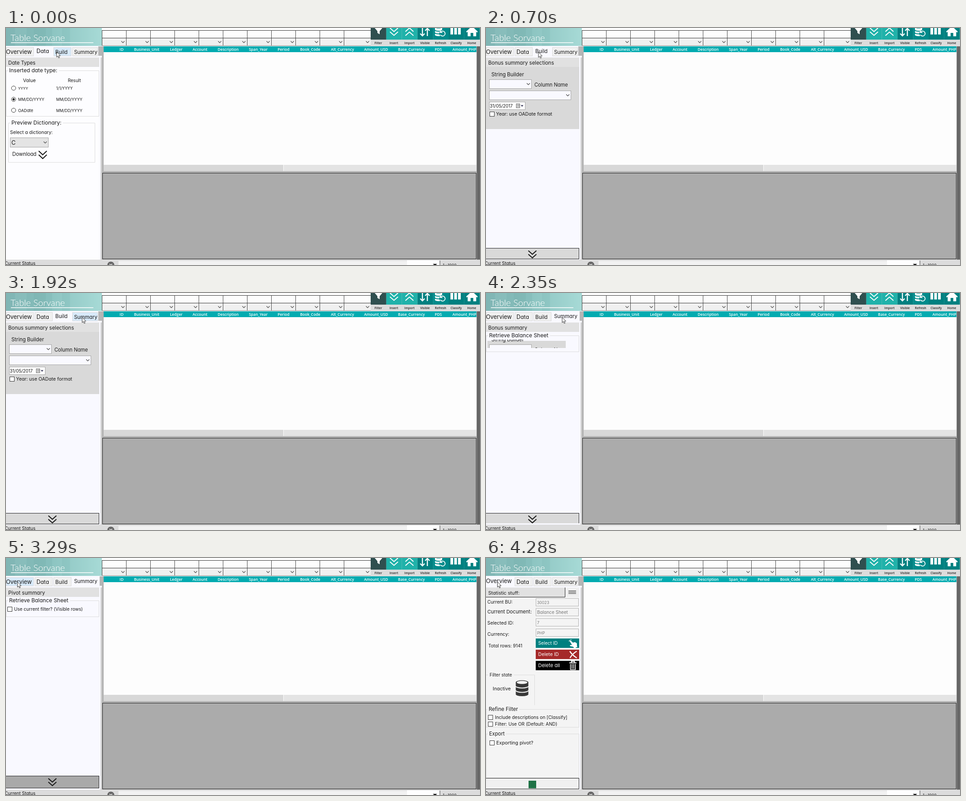
Animation of 1058x530 px, one loop 8.84 s. Source, as an HTML page:

```html
<!DOCTYPE html>
<html lang="en">
<head>
<meta charset="utf-8">
<title>Query panel</title>
<style>
  html, body { margin: 0; width: 100%; height: 100%; overflow: hidden; background: #fff; }
  #stage { display: block; width: 1058px; height: 530px; font-family: Inter, sans-serif; font-feature-settings: "cv11"; }
  .grid { font-family: "Open Sans", sans-serif; font-weight: 600; }
  .title { font-family: Lato, sans-serif; font-weight: 300; }
</style>
</head>
<body>
<svg id="stage" viewBox="0 0 1058 530" xmlns="http://www.w3.org/2000/svg"></svg>
<script>
const LOOP = 8840;
const PANEL = '#f9f9ff', BAR = '#e1e1e1', BLOCK = '#d9d9d9', PALE = '#f4f4f4', INK = '#1a1a1a', EDGE = '#dcdcdc';

// time, page, active tab, hovered tab (-1: none), pointer x, y
const STEPS = [
  [0, 'data', 1, 2, 112.5, 53],
  [120, 'data', 1, 2, 115.5, 53],
  [270, 'data', 1, 2, 116.5, 53.5],
  [700, 'build', 2, -1, 116.5, 53.5],
  [1380, 'build', 2, -1, 132, 57],
  [1530, 'build', 2, -1, 148, 64],
  [1650, 'build', 2, -1, 162, 66],
  [1800, 'build', 2, 3, 167, 58],
  [1920, 'build', 2, 3, 169.5, 54],
  [2350, 'summaryPaint', 3, -1, 169.5, 54],
  [2470, 'summary', 3, -1, 169.5, 54],
  [2900, 'summary', 3, 2, 108, 54],
  [3020, 'summary', 3, 0, 51, 53],
  [3170, 'summary', 3, 0, 34, 53],
  [3290, 'summary', 3, 0, 25, 53],
  [4130, 'overviewPaint', 0, -1, 25, 53],
  [4280, 'overview', 0, -1, 25, 53]
];

const rect = (x, y, w, h, fill, stroke) => stroke
  ? `<rect x="${x + .5}" y="${y + .5}" width="${w - 1}" height="${h - 1}" fill="${fill}" stroke="${stroke}"/>`
  : `<rect x="${x}" y="${y}" width="${w}" height="${h}" fill="${fill}"/>`;
const text = (x, y, size, str, fill = INK, attrs = '') =>
  `<text x="${x}" y="${y}" font-size="${size}" fill="${fill}" ${attrs}>${str}</text>`;
const path = (d, stroke, width = 1, fill = 'none') =>
  `<path d="${d}" fill="${fill}" stroke="${stroke}" stroke-width="${width}"/>`;
const shape = (d, fill) => path(d, 'none', 0, fill);
const clip = (x, y, w, h, body) =>
  `<svg x="${x}" y="${y}" width="${w}" height="${h}" viewBox="${x} ${y} ${w} ${h}">${body}</svg>`;

const arrow = (x, y, color = '#444') => path(`M${x - 3.5} ${y - 2}l3.5 3.5 3.5 -3.5`, color, 1.1);
const chevrons = (x, y, w, h, gap, color, width = 2.2) => [0, gap].map(g =>
  path(`M${x - w} ${y + g}l${w} ${h} ${w} ${-h}`, color, width)).join('');
const combo = (x, y, w, h, fill = PANEL) =>
  rect(x, y, w, h, fill, '#a5a5a5') + arrow(x + w - 7.5, y + h / 2);
const check = (x, y) => rect(x, y, 11, 11, '#fff', '#333');
const radio = (y, on) => `<circle cx="17" cy="${y}" r="4.8" fill="#fff" stroke="#333"/>` +
  (on ? `<circle cx="17" cy="${y}" r="2.6" fill="#222"/>` : '');

// Frame with its caption breaking the top line
const group = (x, y, w, h, tx, gap, size, label) =>
  path(`M${tx - 3} ${y + .5}H${x + .5}V${y + h - .5}H${x + w - .5}V${y + .5}H${tx + gap + 2}`, EDGE) +
  text(tx, y + 4.2, size, label);
const panel = (fill = PANEL) => rect(0, 62, 208, 456, fill);
const heading = (size, label) => rect(0, 66, 208, 21, BAR) + text(5, 82, size, label);
const footer = (y, h, fill) => rect(-2, y, 210, h, fill, '#222');
const balanceGroup = () => group(0, 95, 208, 37, 7, 134, 12, 'Retrieve Balance Sheet');

// Cylinder of three discs
const disks = (x, y, w, h, color, gap) => {
  const r = w / 2, e = w * .17, band = (h - e) / 3;
  return [2, 1, 0].map(i => {
    const top = y + i * band + e, bottom = top + band - e * .3;
    return path(`M${x} ${top}A${r} ${e} 0 0 1 ${x + w} ${top}V${bottom}A${r} ${e} 0 0 1 ${x} ${bottom}Z`, gap, 2, color);
  }).join('') + `<ellipse cx="${x + r}" cy="${y + e + .6}" rx="${r - 3}" ry="${e - 1.6}" fill="${gap}"/>`;
};

function header() {
  const stripes = [[0, 20, .05], [46, 16, .05], [62, 27, .09], [89, 14, .04], [125, 18, .05]];
  return `<defs><linearGradient id="sky"><stop offset="0" stop-color="#86b9b8"/>
    <stop offset=".45" stop-color="#8bc3c0"/><stop offset="1" stop-color="#a7dad6"/></linearGradient></defs>` +
    rect(0, 0, 214, 40, 'url(#sky)') +
    stripes.map(([x, w, a]) => `<rect x="${x}" width="${w}" height="40" fill="#175c5c" opacity="${a}"/>`).join('') +
    text(10, 28.5, 20.3, 'Table Sorvane', '#fff', 'class="title"') + rect(11, 32, 184, 1.5, '#fff');
}

function filterRow() {
  let out = rect(214, 0, 600, 40, '#fdfdfd') + rect(214, 22, 600, 18, '#f0f0f0');
  for (let x = 214; x < 808; x += 54) {
    const end = x === 754 ? 814 : x + 54;
    out += arrow(end - 7, 31.5) + rect(x, 5, 1, 35, '#444');
  }
  return out + rect(214, 5, 600, 1, '#333') + rect(214, 22, 600, 1, '#333') + rect(214, 39, 600, 1, '#888');
}

function toolbar() {
  const items = [['Filter', '#2f4f4f'], ['Insert', '#20b2aa'], ['Import', '#20b2aa'], ['Visible', '#008080'],
    ['Refresh', '#008b8b'], ['Classify', '#008080'], ['Home', '#008080']];
  const w = '#fff';
  return rect(814, 0, 244, 41, '#dcdcdc') + items.map(([label, fill], i) =>
      rect(814 + i * 34.8, 0, 34.8, 26, fill) +
      text(831 + i * 34.75, 36.3, 6.9, label, '#222', 'class="grid" text-anchor="middle"')).join('') +
    shape('M823 0H840L834 7V14L829 11V7Z', w) +
    chevrons(866, 0, 9, 8, 8.5, w, 2) + chevrons(900.5, 8, 9, -8, 9, w, 2) +
    path('M929.5 0V17.5M924.5 12.5l5 5 5-5M940.5 18V1M935.5 6l5-5 5 5', w, 2.4) +
    disks(956.5, -4, 18, 21, w, '#008b8b') +
    `<circle cx="974.5" cy="12.5" r="7.5" fill="#008b8b"/>` +
    path('M969.8 9.5a5.6 5.6 0 1 1 -.2 5.6M969.5 5.5v4.5h4.5', w, 1.8) +
    [992, 1000.5, 1009].map(x => rect(x, 0, 6, 14.5, w)).join('') +
    shape('M1027 8L1040 -4 1053 8 1051.5 10 1049.5 8.3V18.5H1043V11H1037V18.5H1030.5V8.3L1028.5 10Z', w);
}

function table() {
  const cols = [['ID', 258], ['Business_Unit', 314], ['Ledger', 380], ['Account', 433], ['Description', 496],
    ['Span_Year', 563], ['Period', 619.5], ['Book_Code', 679], ['Alt_Currency', 751], ['Amount_USD', 826],
    ['Base_Currency', 905], ['PDS', 965], ['Amount_PHP', 1023]];
  return rect(214, 41, 844, 477, '#b4b4b4') + rect(1051, 41, 7, 477, '#666') +
    rect(218, 41, 832, 13, '#03abb0') +
    cols.map(([name, x]) => text(x, 51, 8.45, name, '#fff', 'class="grid" text-anchor="middle"')).join('') +
    rect(218, 54, 832, 252, '#fdfdfd') + rect(218, 306, 832, 14, '#e4e4e4') +
    rect(218, 306, 401, 14, '#d8d8d8') + rect(619, 306, 1, 14, '#fff') +
    rect(215, 324, 835, 193, '#ababab', '#222');
}

function status() {
  return rect(0, 518, 1058, 12, '#dcdcdc') + text(-3, 530, 10, 'Current Status') +
    `<circle cx="234" cy="530.5" r="8" fill="#666"/>` + path('M231 527.5l6 6m0-6l-6 6', '#eee', 1.6) +
    rect(251, 521, 644, 9, '#f2f2f2') + rect(895, 520, 73, 10, '#fff') +
    shape('M953 527.5h9l-4.5 5z', '#111') + rect(968, 520, 1, 10, '#444') + text(975, 533.5, 8.6, '1 : 1000');
}

const TABS = [['Overview', 0, 62, 0, 12.9], ['Data', 64, 40, 68, 12.4], ['Build', 106, 40, 110, 11.7], ['Summary', 148, 57, 152, 11.4]];
const tab = (i, fill) => {
  const [label, x, w, tx, size] = TABS[i];
  return rect(x, 43, w, 20, fill, '#dadada') + text(tx, 57.5, size, label);
};
const tabs = active => {
  const [label, x, w, tx, size] = TABS[active];
  const end = active === 3 ? 209 : 206;
  return rect(0, 40, 214, 26, PANEL) + rect(end, 41, 214 - end, 21, '#b6b6b6') +
    TABS.map((_, i) => i === active ? '' : tab(i, '#f1f1f1')).join('') +
    rect(x - 2, 41, w + 4, 25, PANEL) + text(tx, 56.2, size, label);
};

const PAGES = {
  data: () => panel('#fdfdff') + heading(11.3, 'Date Types') +
    group(0, 95, 208, 103, 7, 109, 12, 'Inserted date type:') +
    text(38, 121, 10.7, 'Value') + text(138, 121, 10, 'Result') +
    radio(134.5) + text(27, 138, 8.2, 'YYYY') + text(112, 138, 8.7, '1/1/YYYY') +
    radio(159.5, true) + text(27, 163, 8.8, 'MM/DD/YYYY') + text(112, 162.5, 8.8, 'MM/DD/YYYY') +
    radio(184) + text(27, 187.5, 9.2, 'OADate') + text(112, 187.5, 8.8, 'MM/DD/YYYY') +
    group(5, 212, 194, 89, 12, 113, 12.2, 'Preview Dictionary:') +
    text(9, 237, 10.4, 'Select a dictionary:') + combo(9, 245, 86, 22, '#e4e4e4') + text(12, 260.5, 13, 'C') +
    text(14, 286, 11.3, 'Download') + chevrons(82, 275, 9, 8.5, 8.5, INK),

  build: () => panel() + rect(0, 87, 208, 139, BLOCK) + heading(11.5, 'Bonus summary selections') +
    text(12, 107.5, 11.4, 'String Builder') + combo(7, 115, 95, 21) + text(108, 130.5, 11.1, 'Column Name') +
    combo(7, 140, 183, 21) + rect(7, 165, 81, 18, '#fff', '#a5a5a5') + text(8.5, 178, 9.9, '31/05/2017') +
    rect(67, 169, 9, 10, '#d0d0d0', '#777') + path('M70 172h5M70 174.5h5', '#888', .8) +
    shape('M77.5 172.5h6l-3 3.5z', '#335') +
    check(8, 187) + text(22.5, 196, 10.6, 'Year: use OADate format') +
    footer(492, 25, BLOCK) + chevrons(103.5, 498, 9, 8, 8, INK),

  summaryPaint: () => panel() + heading(11.3, 'Bonus summary') + balanceGroup() +
    rect(3, 107, 175, 16, BLOCK) + clip(3, 104, 175, 19,
      text(12, 107.5, 11.4, 'String Builder') + rect(7, 115, 95, 21, PANEL, '#a5a5a5') + text(108, 130.5, 11.1, 'Column Name')) +
    footer(492, 30, BLOCK) + chevrons(103.5, 498, 9, 8, 8, INK) + rect(0, 515, 208, 3, PANEL),

  summary: () => panel() + heading(11.6, 'Pivot summary') + balanceGroup() +
    check(3, 109) + text(18, 118, 10.1, 'Use current filter? (Visible rows)') +
    footer(487, 28, '#a9a9a9') + chevrons(103.5, 493, 9, 8, 8, INK),

  overviewPaint: () => {
    const label = text(7, 99.2, 12, 'Retrieve Balance Sheet');
    const option = check(3, 109) + text(18, 118, 10.1, 'Use current filter? (Visible rows)');
    return panel() + rect(0, 66, 208, 21, BAR) + clip(0, 66, 81, 21, text(5, 82, 11.6, 'Pivot summary')) +
      rect(0, 87, 110, 167, PALE) + [90, 112, 135, 158].map(y => rect(111, y, 96, 18, PANEL, '#c4c4cc')).join('') +
      clip(0, 88, 63, 16, label) + rect(112, 89, 30, 14, PANEL) + clip(111, 88, 40, 16, label) +
      clip(0, 112, 104, 10, option) + clip(112, 112, 62, 10, option) +
      rect(2, 138, 64, 13, PANEL) + rect(1, 163, 54, 13, PANEL) + rect(2, 190, 86, 13, PANEL) +
      rect(0, 380, 208, 112, PALE) + group(0, 393, 208, 99, 7, 35, 11.3, 'Export') + rect(9, 407, 103, 15, PANEL) +
      rect(0, 492, 208, 22, '#a9a9a9') + path('M0 514.5H207.5V492', '#222') +
      clip(90, 492, 30, 22, chevrons(103.5, 493, 9, 8, 8, INK));
  },

  overview: () => {
    const field = (y, ly, label, size, value, vsize) => text(3, ly, size, label) +
      rect(111, y, 96, 18, PALE, '#b4b4b4') + text(114, y + 12.5, vsize, value, '#777');
    const button = (y, fill, size, label) => rect(111, y, 97, 21, fill) + text(116.5, y + 14, size, label, '#fff');
    return panel(PALE) + rect(0, 66, 208, 21, BAR) + text(5, 82, 10.7, 'Statistic stuff:') +
      path('M0 87.5H176.5V66', '#222') + rect(177, 66, 31, 21, '#efefef') +
      path('M184 73.5h17M184 76.5h17M184 79.5h17', '#222', 1.1) +
      field(90, 102, 'Current BU:', 10.2, '30023', 8.7) +
      field(112, 123.5, 'Current Document:', 11, 'Balance Sheet', 10) +
      field(135, 148.5, 'Selected ID:', 10.4, '7', 9) +
      field(158, 173.5, 'Currency:', 10.5, 'PHP', 8.6) +
      text(5, 200, 10.1, 'Total rows: 9141') +
      button(180, '#008080', 10.3, 'Select ID') + button(205, '#a52a2a', 10.7, 'Delete ID') + button(230, '#000', 11, 'Delete all') +
      shape('M186.5 185.5q1.5-2 3.5 0l5 4.5q0-2.5 2.5-1.5 2-1 3 1 2.5 0 2.5 3v4l1 2-6.5 3.5-3-3.5-7-1.5q-1-2.5 2-2.5l2.5 0z', '#fff') +
      path('M185.5 187q-.5-5 6-4', '#fff', 1) +
      path('M187 208.5q6 9 15.5 15M202.5 208.5q-9 5-15 15', '#fff', 2.4) +
      path('M186 234.5h16M190.5 234v-3h7v3', '#fff', 1.8) +
      path('M188.5 237v12.5h11V237M192.2 237v10.5M195.8 237v10.5', '#fff', 1.6) +
      path('M5 261.5H0M62 261.5H108.5V329', EDGE) + text(8, 265, 10, 'Filter state') +
      text(15, 295.5, 10.8, 'Inactive') + disks(65.5, 272.5, 30, 34, '#383838', PALE) +
      group(0, 338, 208, 41, 6, 66, 11.6, 'Refine Filter') +
      check(4.5, 351) + text(20, 360, 10.2, 'Include descriptions on [Classify]') +
      check(4.5, 366) + text(20, 375, 10.2, 'Filter: Use OR (Default: AND)') +
      group(0, 393, 208, 99, 7, 35, 11.3, 'Export') + check(8, 408) + text(23, 417, 10.8, 'Exporting pivot?') +
      footer(492, 25, '#f0f0f0') + rect(95, 498, 17, 17, '#1f7246');
  }
};

// Each layer is shown whenever its test holds for the current step
const layers = [
  ...Object.keys(PAGES).map(name => [PAGES[name](), s => s[1] === name]),
  ...TABS.map((_, i) => [tabs(i), s => s[2] === i]),
  ...TABS.map((_, i) => [tab(i, '#d8eafa'), s => s[3] === i])
];

const stage = document.getElementById('stage');
stage.innerHTML = rect(0, 0, 1058, 530, '#fff') + header() + filterRow() + toolbar() + table() +
  rect(208, 41, 3, 477, PANEL) + rect(211, 41, 3, 477, '#d4d4d4') +
  layers.map(([body]) => `<g class="layer">${body}</g>`).join('') + status() +
  `<g id="pointer">${path('M.5 .5V12.2L3.2 9.7 5 14 7 13.2 5.2 9H9Z', '#222', .9, '#fff')}</g>`;

function play(el, frame) {
  const frames = STEPS.map(s => ({ offset: s[0] / LOOP, easing: 'step-end', ...frame(s) }));
  frames.push({ ...frames[frames.length - 1], offset: 1 });
  el.animate(frames, { duration: LOOP, iterations: Infinity });
}

stage.querySelectorAll('.layer').forEach((el, i) =>
  play(el, s => ({ opacity: layers[i][1](s) ? 1 : 0 })));
play(document.getElementById('pointer'), s => ({ transform: `translate(${s[4]}px, ${s[5]}px)` }));
</script>
</body>
</html>
```
